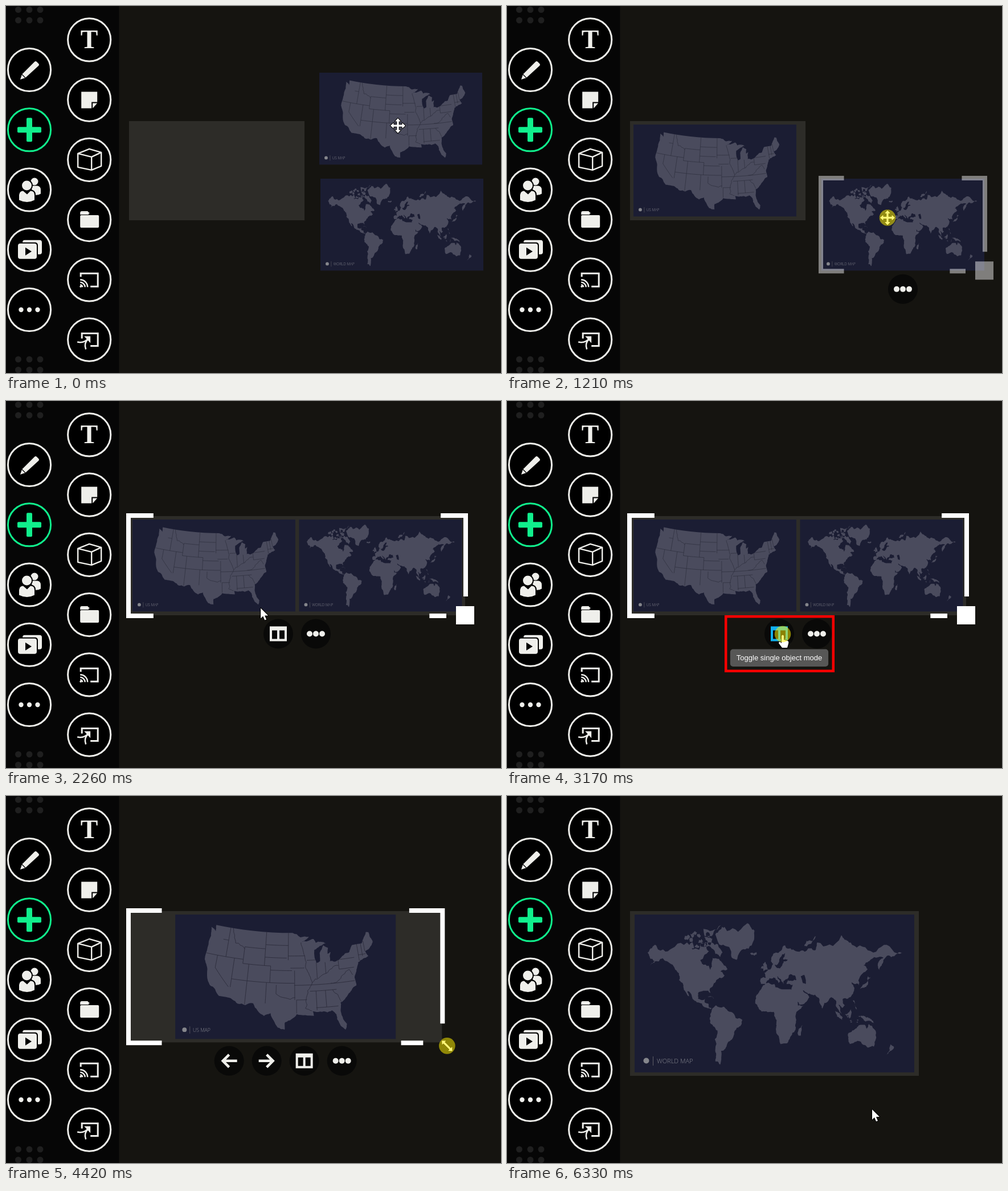
An HTML page with a canvas that plays this animation: 869x644 px, repeating every 7.04 s.

```html
<!DOCTYPE html>
<html lang="en">
<head>
<meta charset="utf-8">
<title>Grouping maps in a container</title>
<style>
  html, body { margin: 0; width: 100%; height: 100%; overflow: hidden; background: #151410; }
  canvas { display: block; }
</style>
</head>
<body>
<canvas id="stage" width="869" height="644"></canvas>
<script>
const ctx = document.getElementById('stage').getContext('2d');
const LOOP = 7040;
const INK = '#efefeb', GREEN = '#10ef8c', BLUE = '#10b0f2', SEA = '#1b1d33', LAND = '#4a4b5d';
const MAP_W = 491, MAP_H = 277, SMALL = 286;

let seed = 7;
const random = () => (seed = (seed * 16807) % 2147483647) / 2147483647;
const radians = degrees => degrees * Math.PI / 180;

// Conic projection for the country map, Miller cylindrical for the world.
function conic([lon, lat]) {
  const r = 916 + (37 - lat) * 9.33;
  const angle = 0.4 * Math.sin((lon + 95.3) * 0.0081 / 0.4);
  return [260 + r * Math.sin(angle), -763 + r * Math.cos(angle)];
}
function miller([lon, lat]) {
  return [233 + 1.25 * lon, 176.5 - 101 * Math.log(Math.tan(Math.PI / 4 + 0.4 * radians(lat)))];
}

// Splits an edge into a ragged coast; edges along a parallel stay smooth.
function bend(path, a, b, project, rough, depth = 3) {
  if (!depth) return path.lineTo(...project(b));
  const dx = b[0] - a[0], dy = b[1] - a[1];
  const push = dy ? rough * (random() - 0.5) : 0;
  const mid = [(a[0] + b[0]) / 2 - dy * push, (a[1] + b[1]) / 2 + dx * push];
  bend(path, a, mid, project, rough, depth - 1);
  bend(path, mid, b, project, rough, depth - 1);
}
function trace(path, points, project, rough) {
  path.moveTo(...project(points[0]));
  for (let i = 1; i < points.length; i++) bend(path, points[i - 1], points[i], project, rough);
}
function coast(path, text, project, rough) {
  const points = text.split(',').map(pair => pair.trim().split(' ').map(Number));
  trace(path, [...points, points[0]], project, rough);
}

const country = new Path2D();
coast(country, `-95.1 49, -89.6 48, -92.1 46.8, -88 47.4, -87.4 46.5, -84 46.2, -88 44.8, -87.6 41.7, -86.4 42,
  -86.3 44, -85 45.7, -83.4 45, -83.8 43.7, -82.7 44, -83.2 41.8, -81.5 41.6, -79 42.7, -76.3 43.5, -74.9 45, -71.5 45,
  -69.2 47.4, -68.2 47.3, -67.3 44.8, -70.8 43, -70 41.7, -73.9 40.7, -74.9 39, -75.9 37.2, -75.7 35.3, -78 33.9,
  -81.2 31.8, -81.4 30.3, -80.1 26.5, -80.7 25.2, -82.7 27.8, -82.8 29, -84 30.1, -85.3 29.7, -89.5 30.2, -89.2 29.1,
  -94 29.6, -97.2 27.7, -97.3 25.9, -99.2 26.4, -101.3 29.7, -103.1 29, -106.5 31.8, -111 31.3, -114.8 32.5,
  -117.1 32.5, -120.6 34.6, -122.4 37.3, -124.3 40.4, -123.9 46.2, -124.5 48.3, -122.5 47.5, -122.8 49`, conic, 0.2);

// State lines: each parallel is "lat from to", each meridian "lon from to".
const borders = new Path2D();
const segments = (text, toPoints) => text.split(',').forEach(part =>
  trace(borders, toPoints(...part.trim().split(' ').map(Number)), conic, 0));
segments(`46 -119 -117, 45 -111 -104, 42 -124.2 -111, 41 -111 -102, 43 -104 -97, 46 -104 -96.5, 40 -102 -95.3,
  37 -114 -94.6, 43.5 -96.5 -91.2, 40.6 -95.8 -91.5, 36.5 -94.6 -76, 33 -94 -91, 35 -90 -82, 31 -88.4 -82,
  42.4 -90.6 -87.8, 42 -79.8 -75, 39.7 -80.5 -75.6, 42.4 -73.4 -70.8`, (lat, a, b) => [[a, lat], [b, lat]]);
segments(`-117 42 49, -120 39 42, -114 35 42, -111 41 45, -109 31.4 41, -104 41 49, -103 32 37, -102 37 41, -100 34.4 36.5,
  -96.5 42.5 49, -94.5 33 40, -94 29.8 33, -88.2 30.4 35, -85.4 31 35, -87.6 38 41.7, -84.8 39 41.7, -80.5 39.7 42,
  -73.4 41 45, -72 42 45, -70.9 43 45.5`, (lon, a, b) => [[lon, a], [lon, b]]);
const rivers = [
  [[-92.3, 46.7], [-91.2, 43.5], [-91, 40.5], [-89.2, 37], [-91.2, 33], [-91.5, 31], [-89.7, 30.3]],
  [[-89.2, 37], [-84.8, 39], [-80.6, 40.6]],
  [[-116, 49], [-114.4, 45.6], [-111, 44.5]],
  [[-100, 34.4], [-94.4, 33.6]],
  [[-83.2, 35], [-81, 32]],
  [[-83.6, 36.6], [-80.3, 37.5], [-77.2, 39.3], [-76.3, 38]]
];
rivers.forEach(points => trace(borders, points, conic, 0.3));
trace(borders, [[-120, 39], [-114.6, 35]], conic, 0);

const world = new Path2D();
const continents = [
  `-168 66, -156 71, -130 70, -96 68, -94 72, -82 67, -94 60, -92 57, -82 55, -80 51, -78 58, -77 62, -70 61, -65 59,
  -56 52, -66 50, -60 46, -70 42, -76 36, -81 31, -80 25.5, -83 29.5, -90 29.5, -97 27, -97 20, -91 18.5, -87 21, -88 16,
  -83 14.5, -82 9, -77 8.5, -80 7.5, -92 14.5, -105 20, -112 29, -110 23, -118 34, -124 41, -124 48, -133 56, -146 61,
  -152 59, -165 54.5, -158 58.5, -165 62`,
  `-77 8.5, -72 12, -62 10.5, -51 4, -35 -6, -39 -14, -48 -27, -57 -36, -65 -42, -66 -55, -73 -52, -73 -40, -70 -19,
  -76 -14, -81 -5, -80 1`,
  `-6 35.5, 10 37, 11 33.5, 20 31, 33 31, 43 12, 51 11.5, 40 -4, 40 -15, 35 -22, 26 -34, 18.5 -34.5, 12 -17, 13 -6, 9 4,
  -8 4.5, -17 14.5, -16 23, -10 30`,
  `-9 37, -9 43, -2 43.5, -4 48.4, 4 51.5, 10 57, 12 54, 20 54.5, 23 59, 30 60, 22 61, 25 65.5, 18 62, 13 55.5, 5 59,
  12 66, 25 71, 40 67, 60 69, 60 42, 41 41.5, 38 46, 31 46.5, 28 42, 23 40.5, 22.5 36.5, 19 42, 13 45.5, 18 40, 16 38,
  9 44, 3 43, -2 37`,
  `58 69, 68 68, 70 73, 104 77.5, 113 74, 130 71, 160 70, 190 66, 178 63, 163 60, 157 51, 156 58, 163 62, 143 59, 135 55,
  141 52, 128 41, 129 35.5, 126 37.5, 118 39, 122 31, 119 25, 106 20, 109 12, 105 9, 100 13, 104 1.5, 98 9, 97 17, 90 22,
  80 15, 77 8, 73 20, 67 25, 57 26, 50 30, 59 22, 45 13, 34 28, 36 36, 27 37, 29 41, 41 41.5, 58 45`,
  `114 -22, 122 -18, 131 -12, 136 -12, 140 -17, 142.5 -11, 153 -27, 150 -37, 141 -38.5, 130 -31.5, 116 -34.5`,
  `-73 78, -60 82, -30 83.3, -18 80, -22 71, -40 65, -43 60, -50 62, -54 70`
];
const islands = [
  '-24 65.5, -15 66, -15 64.5, -22 64', '-5 50, 1 51.5, -3 58.5, -6 57', '-10 52, -6 52.5, -6 55',
  '44 -25, 44 -17, 49.5 -12.5, 47 -25', '130 31.5, 140 39, 145 43.5, 141 45, 141 36', '95 5.5, 106 -3, 105 -6',
  '109 1, 117 7, 118 1, 115 -4', '131 -1, 141 -2.5, 150 -10, 138 -8', '120 18, 122 18, 126 7',
  '173 -35, 178 -38, 167 -46, 172 -41', '52 71, 55 74, 68 77, 57 71.5', '-88 73, -78 73, -63 66, -66 62.5, -73 65',
  '-117 71, -105 73, -103 69, -115 69', '-90 81, -65 83, -78 77, -88 77', '-84 22.5, -79 23, -75 20'
];
[...continents, ...islands].forEach(text => coast(world, text, miller, 0.35));

// Loose islets fill an archipelago.
function scatter(lon, lat, spanLon, spanLat, count, size) {
  for (let i = 0; i < count; i++) {
    const x = lon + (random() - 0.5) * spanLon, y = lat + (random() - 0.5) * spanLat;
    const corners = [0, 1, 2, 3, 4].map(k => {
      const r = size * (0.5 + random());
      return [x + r * Math.cos(k * 1.257), y + r * 0.4 * Math.sin(k * 1.257)];
    });
    trace(world, [...corners, corners[0]], miller, 0.3);
  }
}
scatter(-98, 74.5, 45, 9, 14, 3.5);
scatter(122, -4, 18, 10, 7, 1.6);

const lakes = new Path2D();
coast(lakes, '47 45, 52 46.5, 54 37, 50 38', miller, 0.2);

const MAPS = {
  us: { label: 'US MAP', land: country, lines: borders },
  world: { label: 'WORLD MAP', land: world, lakes }
};

function circle(x, y, r, fill) {
  ctx.fillStyle = fill;
  ctx.beginPath();
  ctx.arc(x, y, r, 0, Math.PI * 2);
  ctx.fill();
}

function rounded(x, y, w, h, r, fill) {
  ctx.fillStyle = fill;
  ctx.beginPath();
  ctx.roundRect(x, y, w, h, r);
  ctx.fill();
}

function fillPath(d, color) {
  ctx.fillStyle = color;
  ctx.fill(new Path2D(d));
}

function strokePath(d, color, width) {
  ctx.strokeStyle = color;
  ctx.lineWidth = width;
  ctx.stroke(new Path2D(d));
}

function at(x, y, draw, scale = 1) {
  ctx.save();
  ctx.translate(x, y);
  ctx.scale(scale, scale);
  draw();
  ctx.restore();
}

function dots(gap, r, color = INK) {
  for (const i of [-1, 0, 1]) circle(i * gap, 0, r, color);
}

// Sidebar icons are drawn around the centre of their button.
const icons = {
  pencil() {
    fillPath('M9-14Q11-16 13-14L16-11Q18-9 16-7L-7 14-16 17-13 8Z', INK);
    strokePath('M-13 8-7 14', '#000', 1.2);
  },
  plus() {
    rounded(-21, -5, 42, 10, 2, GREEN);
    rounded(-5, -21, 10, 42, 2, GREEN);
  },
  people() {
    circle(9, -14.5, 6.5, INK);
    fillPath('M2-7H14Q20-6 20 0V7Q15 10 8 9Z', INK);
    const body = 'M-18 18V9Q-17 2-11 2L-4 8 2 2Q9 2 9 9V18Q-4 25-18 18Z';
    strokePath(body, '#000', 4);
    circle(-4.5, -7.5, 10.5, '#000');
    fillPath(body, INK);
    circle(-4.5, -7.5, 8.5, INK);
  },
  video() {
    rounded(-12, -17, 34, 25, 4, INK);
    rounded(-22, -13, 37, 31, 5, '#000');
    rounded(-20, -11, 33, 27, 4, INK);
    fillPath('M-7-4 4 3-7 10Z', '#000');
  },
  more() { dots(14.5, 4.2); },
  text() {
    ctx.fillStyle = INK;
    ctx.font = 'bold 46px "Liberation Serif", serif';
    ctx.textAlign = 'center';
    ctx.fillText('T', 0, 15);
  },
  note() { fillPath('M-14-14H14V4H4V15H-14Z M6 15V6H14Z', INK); },
  cube() {
    ctx.lineJoin = 'round';
    strokePath('M-20-11 0-19 21-13V11L4 18-20 13ZM-20-11 4-5 21-13M4-5V18', INK, 2.4);
  },
  folder() {
    fillPath('M-16-9V-12Q-16-15-13-15H-3L1-11H-1V-9Z', INK);
    rounded(-16, -8, 33, 22, 2, INK);
  },
  cast() {
    strokePath('M-15-5V-11H15V12H2', INK, 3);
    for (const r of [4, 8.5, 13]) strokePath(`M-16 ${13 - r}A${r} ${r} 0 0 1 ${r - 16} 13`, INK, 2.5);
    circle(-15, 12, 1.8, INK);
  },
  share() {
    strokePath('M-13-2V-11H15V11H2', INK, 3);
    strokePath('M-21 4Q-9 7-1-3M-6 17Q-10 6-2-1', INK, 2.6);
    fillPath('M-9-6H2V6Z', INK);
  }
};

function sidebar() {
  ctx.fillStyle = '#060606';
  ctx.fillRect(0, 0, 198.5, 644);
  for (const x of [21.5, 41, 60])
    for (const y of [6.5, 25, 620, 638.5]) circle(x, y, 5.5, '#1f1f1f');
  const column = (x, top, names) => names.forEach((name, i) => {
    const y = top + i * 105.25;
    circle(x, y, 37.6, '#000');
    ctx.lineWidth = 3;
    ctx.strokeStyle = name === 'plus' ? GREEN : INK;
    ctx.stroke();
    at(x, y, icons[name]);
  });
  column(41, 112, ['pencil', 'plus', 'people', 'video', 'more']);
  column(146.2, 59.3, ['text', 'note', 'cube', 'folder', 'cast', 'share']);
}

function drawMap(name, x, y, w) {
  const { label, land, lines, lakes } = MAPS[name];
  at(x, y, () => {
    ctx.fillStyle = SEA;
    ctx.fillRect(0, 0, MAP_W, MAP_H);
    ctx.fillStyle = LAND;
    ctx.fill(land);
    ctx.fillStyle = SEA;
    if (lakes) ctx.fill(lakes);
    ctx.strokeStyle = '#2b2c3b';
    ctx.lineWidth = 1.1;
    if (lines) ctx.stroke(lines);
    circle(20.5, 256.5, 5, '#85868c');
    ctx.fillStyle = '#5f5f66';
    ctx.fillRect(32, 249, 1, 16);
    ctx.fillStyle = '#8a8b93';
    ctx.font = '300 11px "Open Sans", sans-serif';
    ctx.textAlign = 'left';
    ctx.fillText(label, 39, 261);
  }, w / MAP_W);
}

function selection([x, y, w, h], soft, handle) {
  const bar = 8, gap = 38, margin = 5;
  const left = x - margin, top = y - margin, right = x + w + margin, bottom = y + h + margin;
  const arm = (bottom - top) * 0.26, tail = arm * 0.62;
  ctx.fillStyle = soft ? 'rgba(255,255,255,.45)' : '#fff';
  ctx.beginPath();
  ctx.rect(left, top, bar, bottom - top);
  ctx.rect(left + bar, top, arm - bar, bar);
  ctx.rect(left + bar, bottom - bar, arm - bar, bar);
  ctx.rect(right - arm, top, arm - bar, bar);
  ctx.rect(right - bar, top, bar, bottom - top - gap);
  ctx.rect(right - gap - tail, bottom - bar, tail, bar);
  if (handle) ctx.rect(x + w - 16, y + h - 16, 32, 32);
  ctx.fill();
}

const buttonIcons = {
  back(color) { strokePath('M14 0H-10M0-11-11 0 0 11', color, 4.5); },
  next(color) { strokePath('M-14 0H10M0-11 11 0 0 11', color, 4.5); },
  split(color) { strokePath('M-13-11H13V11H-13ZM-13-8H13M0-8V11', color, 4); },
  more(color) { dots(11, 5, color); }
};

function toolbar([x, y, w, h], names, hot) {
  names.forEach((name, i) => at(x + w / 2 + (i - (names.length - 1) / 2) * 66, y + h + 32.5, () => {
    circle(0, 0, 26, '#090908');
    buttonIcons[name](name === hot ? BLUE : INK);
  }));
}

function tooltip(text, x, y) {
  ctx.font = '13px "Liberation Sans", Arial, sans-serif';
  ctx.textAlign = 'center';
  const w = ctx.measureText(text).width + 22;
  rounded(x - w / 2, y, w, 30.5, 5, '#575756');
  ctx.fillStyle = '#fff';
  ctx.fillText(text, x, y + 19.5);
}

const ARROW = 'M-1.7 0V-7.5H-5L0-13 5-7.5H1.7V0Z';
const cursors = {
  hand: 'M-2 1Q0-2 2 1V8L9 10Q11 11 10 15L8 22H-1L-7 14Q-7 11-4 12L-2 14Z',
  pointer: 'M0 0V18L4 14 7 21 10 20 7 13H13Z'
};

function cursor(kind, x, y, scale = 1) {
  const shape = new Path2D();
  const arrows = { move: [0, 90, 180, 270], resize: [-45, 135] }[kind];
  if (arrows) arrows.forEach(turn => shape.addPath(new Path2D(ARROW), new DOMMatrix().rotate(turn)));
  else shape.addPath(new Path2D(cursors[kind]));
  at(x, y, () => {
    ctx.lineJoin = 'round';
    ctx.lineWidth = 2;
    ctx.strokeStyle = '#000';
    ctx.stroke(shape);
    ctx.fillStyle = '#fff';
    ctx.fill(shape);
  }, scale);
}

const bursts = [[210, 1210, 6], [1410, 1980, 4], [2260, 2770, 3], [3170, 4180, 5], [4420, 4920, 3], [5310, 6330, 5]];
function snap(time) {
  const [start, end, count] = bursts.findLast(([from]) => from <= time) || [0, 0, 1];
  const step = (end - start) / (count - 1) || 1;
  return Math.min(end, start + Math.floor((time - start) / step) * step);
}

// Linear track through [time, ...values] keys.
function track(t, ...keys) {
  const i = keys.findIndex(key => key[0] > t);
  if (i === 0) return keys[0].slice(1);
  if (i < 0) return keys.at(-1).slice(1);
  const [a, b] = [keys[i - 1], keys[i]];
  const k = (t - a[0]) / (b[0] - a[0]);
  return a.slice(1).map((v, n) => v + (b[n + 1] - v) * k);
}

function fit([x, y, w, h]) {
  const width = Math.min((w - 15) / MAP_W, (h - 12) / MAP_H) * MAP_W;
  return [x + (w - width) / 2, y + 6, width];
}

function render(time) {
  const t = snap(time);
  const during = (...spans) => spans.some(([from, to]) => t >= from && t < to);
  const single = t >= 3400;

  const size = t < 1750 ? [308, 174] : track(t, [4180, 590, 174], [4670, 507, 289]);
  const box = [216, 202, ...size];
  const us = track(t, [210, 550, 117], [610, 249.5, 201.5], [800, 222, 208]);
  const globe = track(t, [1210, 552, 303], [1600, 262.5, 205.7], [1780, 514.5, 208]);
  const dragUs = during([210, 800]), dragGlobe = during([1210, 1750]), resize = during([4180, 4600]);

  ctx.fillStyle = '#151410';
  ctx.fillRect(0, 0, 869, 644);
  sidebar();
  ctx.fillStyle = during([400, 800], [1400, 1750]) ? '#43423d' : '#2d2c28';
  ctx.fillRect(...box);
  if (single) drawMap(t < 5500 ? 'us' : 'world', ...fit(box));
  else {
    drawMap('us', ...us, SMALL);
    drawMap('world', ...globe, SMALL);
  }

  const dragged = dragUs ? us : dragGlobe ? globe : null;
  const hover = during([2500, 3600], [4900, 5800]);
  const hot = hover && (single ? 'next' : 'split');
  if (dragged) {
    const area = [...dragged, SMALL, SMALL * MAP_H / MAP_W];
    selection(area, true, true);
    toolbar(area, ['more'], null);
  } else if (during([2260, 6300])) {
    selection(box, false, !resize);
    toolbar(box, single ? ['back', 'next', 'split', 'more'] : ['split', 'more'], hot);
  }
  if (hover) {
    const x = box[0] + box[2] / 2 - 33;
    tooltip(single ? 'Next object' : 'Toggle single object mode', x, box[1] + box[3] + 59.5);
  }
  if (during([2770, 3400])) {
    ctx.strokeStyle = '#f00';
    ctx.lineWidth = 4.5;
    ctx.strokeRect(384.2, 378.2, 188.6, 95.6);
  }

  let spot = track(t, [0, 688, 210], [800, 387.5, 294], [1210, 668, 371.5], [1790, 378, 274], [2510, 484, 411],
    [3430, 484, 411], [3930, 806, 376], [4670, 723, 491], [4920, 435, 524], [5570, 435, 524], [6075, 641, 550]);
  if (dragUs) spot = [us[0] + 138, us[1] + 92.5];
  if (dragGlobe) spot = [globe[0] + 116, globe[1] + 68.5];
  if (resize) spot = [box[0] + box[2] + 9, box[1] + box[3] + 6];
  if (during([4180, 4400])) cursor('move', 806, 375, 1.4);
  cursor(t < 2200 ? 'move' : hover ? 'hand' : during([3900, 4800]) ? 'resize' : 'pointer', ...spot);
  if (dragged || resize || during([3170, 3400], [5310, 5500]))
    circle(spot[0], spot[1] - (hover ? 2 : 0), 14.3, 'rgba(255,240,0,.53)');
}

const start = performance.now();
function tick() {
  render((performance.now() - start) % LOOP);
  requestAnimationFrame(tick);
}
tick();
</script>
</body>
</html>
```
